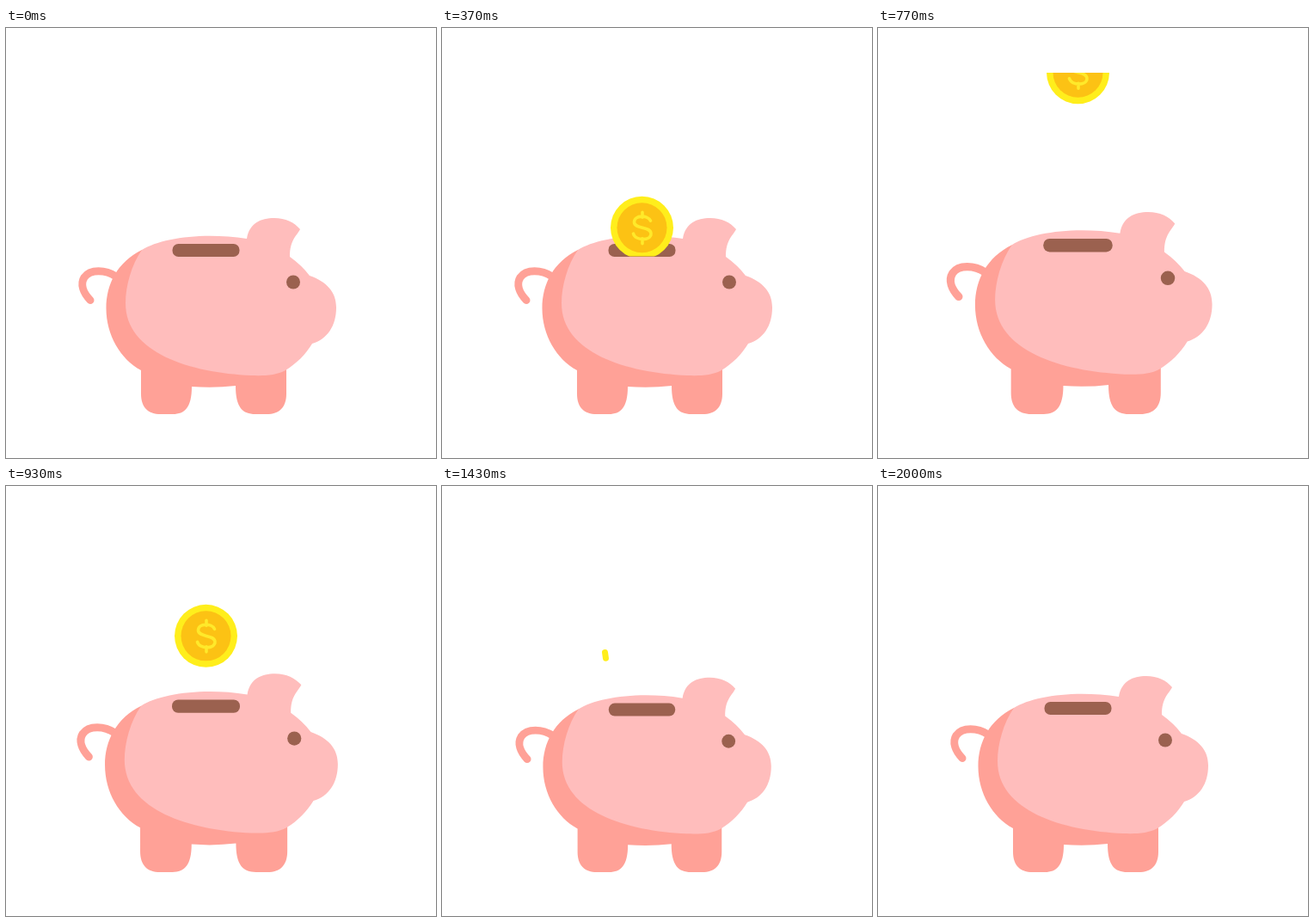
Animation of 500x500 px, one loop 2030 ms. Source, as an HTML page:

```html
<!DOCTYPE html>
<html lang="en">
<head>
<meta charset="utf-8">
<title>Piggy bank</title>
<style>
html, body { margin: 0; width: 100%; height: 100%; overflow: hidden; background: #fff; }
svg { display: block; width: 100vw; height: 100vh; }
</style>
</head>
<body>
<svg viewBox="0 0 500 500">
  <defs>
    <clipPath id="chute"><rect x="150" y="52" width="170" height="213.5"/></clipPath>
    <g id="coin">
      <circle r="36.5" fill="#ffee1c"/>
      <circle r="29" fill="#fcc214"/>
      <path d="M10 -8C7 -15 -9 -15 -9 -6.500C-9 2 10.500 -2 10.500 7C10.500 15.500 -7.500 15.500 -10 7M.5 -18v6M.5 12.500v6"
        fill="none" stroke="#ffe92a" stroke-width="3.6" stroke-linecap="round"/>
    </g>
  </defs>
  <g id="pig">
    <path d="M128 289C116 281 98 280 91 290C86 298 90 308 98 316.500"
      fill="none" stroke="#ffa197" stroke-width="9" stroke-linecap="round"/>
    <path fill="#ffa197" d="M158 258C130 272 116.500 297 116.500 326C116.500 357 133 385 157 398V425
      C157 441 165 449 180 449H194C208 449 216 441 216 417Q242 419 267 416
      C267 441 275 449 290 449H303C318 449 326 441 326 425V396L300 300Z"/>
    <path fill="#ffbdbc" d="M158 258C180 244 230 237 280 245C283 227 296 221 312 221
      C325 221 335 226 342 234C337 243 330 247 330 266Q344 276 353 288
      C373 295 384 307 384 325C384 347 373 362 356 367C348 380 338 390 325 398
      C314 404 301 404.500 285 404C215 401 139 378 139 320C139 300 146 275 158 258Z"/>
    <rect x="193.500" y="251" width="78" height="15" rx="7" fill="#9b614f"/>
    <circle cx="334" cy="295.500" r="8" fill="#9b614f"/>
  </g>
  <g clip-path="url(#chute)">
    <use href="#coin" class="coin"/>
    <use href="#coin" class="coin"/>
  </g>
  <g id="sparks" stroke="#ffee1c" stroke-width="7" stroke-linecap="round">
    <line/><line/><line/>
  </g>
</svg>
<script>
const LOOP = 2030;
const pig = document.getElementById('pig');
const coins = document.querySelectorAll('.coin');
const lines = document.querySelectorAll('#sparks line');

const progress = (t, a, b) => Math.min(1, Math.max(0, (t - a) / (b - a)));
const mix = (a, b, p) => a + (b - a) * p;
const swing = p => (1 - Math.cos(Math.PI * p)) / 2;
const settle = p => 1 - (1 - p) ** 2.5;

// start, end, scale reached, easing
const pulses = [
  [430, 650, 1.06, swing],
  [650, 1050, 1.01, settle],
  [1090, 1280, 1.054, swing],
  [1280, 1470, 0.985, swing],
  [1470, 2000, 1, swing]
];
const landings = [693, 1355];
// from, to, grow start, full length, shrink start, gone
const sparks = [
  [267, 253, 288, 187, 1130, 1200, 1215, 1415],
  [232, 253, 233, 172.5, 1205, 1270, 1275, 1420],
  [198, 253, 189.5, 193.5, 1210, 1290, 1290, 1449]
];

function pigScale(t) {
  let s = 1;
  for (const [a, b, to, ease] of pulses) s = mix(s, to, ease(progress(t, a, b)));
  return s;
}

function coinY(t, landing) {
  return 311 - 0.00076 * Math.max(0, landing - t) ** 2;
}

function drawSpark(line, [x1, y1, x2, y2, a, b, c, d], t) {
  const head = progress(t, a, b), tail = progress(t, c, d);
  const set = (name, value) => line.setAttribute(name, value);
  set('x1', mix(x1, x2, tail));
  set('y1', mix(y1, y2, tail));
  set('x2', mix(x1, x2, head));
  set('y2', mix(y1, y2, head));
  set('visibility', head > tail ? 'visible' : 'hidden');
}

function draw(now) {
  const t = now % LOOP;
  pig.setAttribute('transform', `translate(234 449) scale(${pigScale(t)}) translate(-234 -449)`);
  coins.forEach((coin, i) => coin.setAttribute('transform', `translate(232.5 ${coinY(t, landings[i])})`));
  lines.forEach((line, i) => drawSpark(line, sparks[i], t));
}

const start = performance.now();
function tick() {
  draw(performance.now() - start);
  requestAnimationFrame(tick);
}
tick();
</script>
</body>
</html>
```
